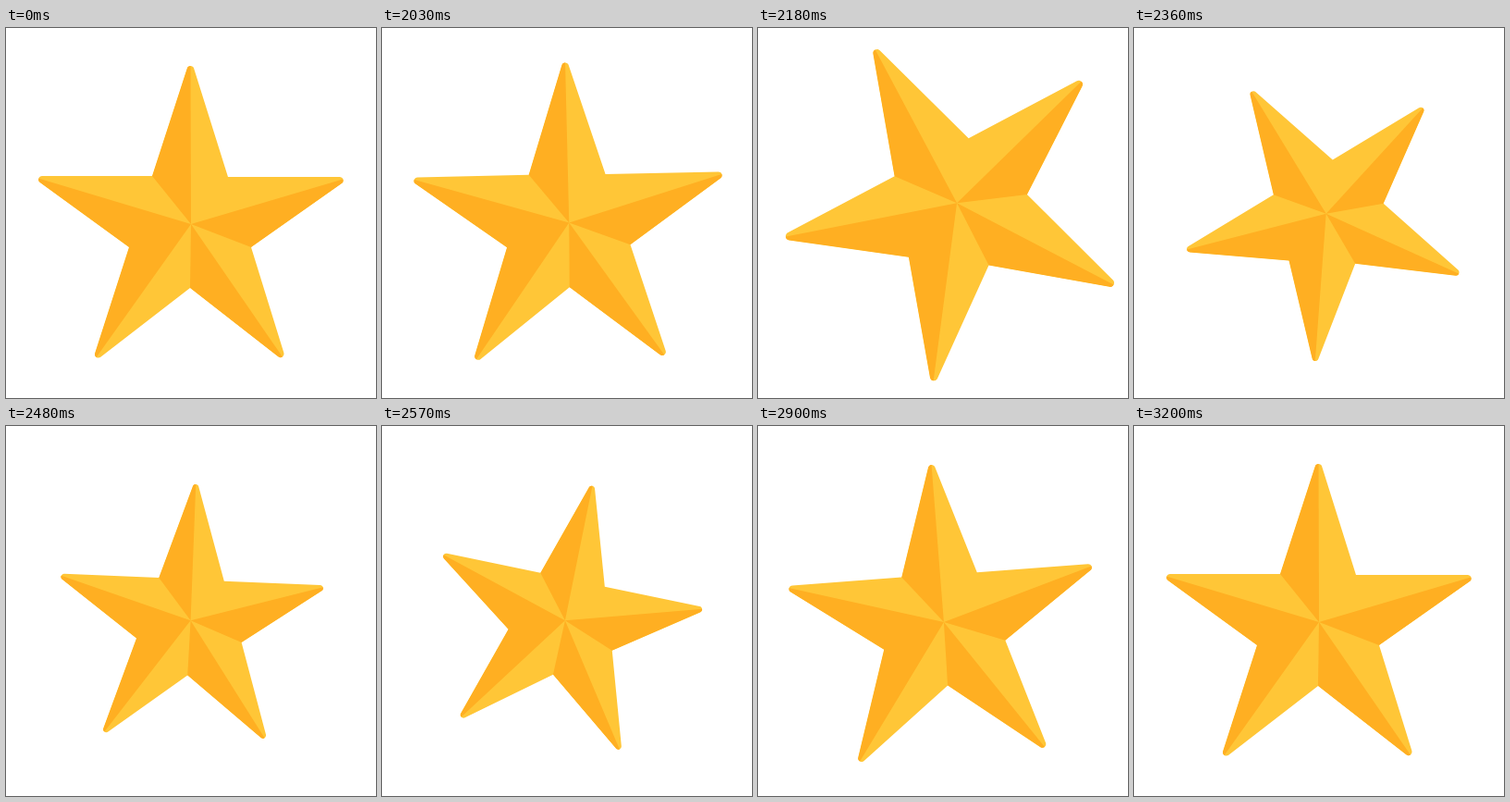
Recreate the animation shown at these times as an HTML page with a canvas. Size 400 px wide and 400 px high, loop 3.23 s.

```html
<!DOCTYPE html>
<html>
<head>
<meta charset="utf-8">
<style>
  html, body { margin: 0; width: 100%; height: 100%; overflow: hidden; background: #fff; }
  canvas { display: block; }
</style>
</head>
<body>
<canvas width="400" height="400"></canvas>
<script>
const ctx = document.querySelector('canvas').getContext('2d');
const LOOP = 3230, REST = 2030, STEP = 30;
const LIGHT = '#ffc637', DARK = '#ffaf22';

// Star geometry, clockwise from the top
const hub = [200, 212];
const tips = [[199.5, 32], [373, 161], [304, 363], [92.3, 363.5], [27, 160]];
const notches = [[240, 161], [265, 237], [199, 281], [133, 237], [158, 160]];
const darkFacets = [
  [hub, notches[4], tips[0]],
  [hub, tips[1], notches[1]],
  [hub, tips[2], notches[2]],
  [hub, tips[3], notches[3], tips[4]],
];

const outline = new Path2D();
outline.moveTo(...notches[4]);
tips.forEach((tip, i) => {
  outline.arcTo(...tip, ...notches[i], 3.9);
  outline.lineTo(...notches[i]);
});
outline.closePath();

// Tracks of [step, value], eased in and out between keys
const angleKeys = [[0, 0], [9.6, -40.8], [18.4, 12], [25.5, -6], [38.5, 0]];
const scaleKeys = [[0, 1], [5, 1.105], [14.6, 0.86], [18, 0.863], [26.5, 0.987], [32, 1]];
const xKeys = [[0, 0], [3.5, 10], [15.5, 0]];
const yKeys = [[0, 0], [6, -22.5], [16.3, 0]];

function valueAt(keys, step) {
  const next = keys.findIndex(([at]) => at > step);
  if (next < 0) return keys[keys.length - 1][1];
  const [t0, v0] = keys[next - 1], [t1, v1] = keys[next];
  const u = (step - t0) / (t1 - t0);
  return v0 + (v1 - v0) * u * u * (3 - 2 * u);
}

function draw(time) {
  const step = time < REST ? 0 : Math.floor((time - REST) / STEP) + 1;
  const scale = valueAt(scaleKeys, step);

  ctx.fillStyle = '#fff';
  ctx.fillRect(0, 0, 400, 400);
  ctx.save();
  ctx.translate(200 + valueAt(xKeys, step), 200 + valueAt(yKeys, step));
  ctx.rotate(valueAt(angleKeys, step) * Math.PI / 180);
  ctx.scale(scale, scale);
  ctx.translate(-200, -200);
  ctx.clip(outline);
  ctx.fillStyle = LIGHT;
  ctx.fillRect(0, 0, 400, 400);
  ctx.fillStyle = DARK;
  for (const facet of darkFacets) {
    ctx.beginPath();
    facet.forEach(point => ctx.lineTo(...point));
    ctx.fill();
  }
  ctx.restore();
}

function tick() {
  draw(performance.now() % LOOP);
  requestAnimationFrame(tick);
}
tick();
</script>
</body>
</html>
```
